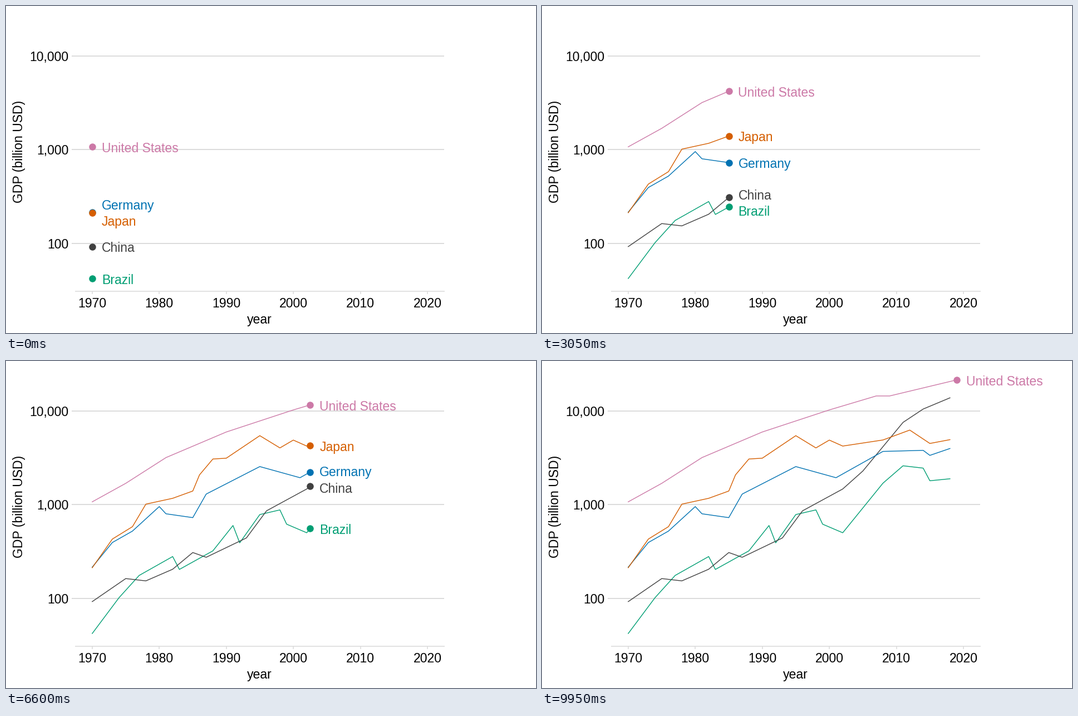
Write a matplotlib script that moves like this. It is 952 px wide and 588 px high and loops after 10 s.

```python
import matplotlib.pyplot as plt
import numpy as np
from matplotlib.animation import FuncAnimation

W, H, DPI = 952, 588, 112
PX = 72 / DPI                      # points per pixel
FRAMES, INTERVAL = 200, 50
START, SPAN = 1970, 49
GREY = "#d9d9d9"
LABEL_GAP, BASELINE = 29.3, 9.6

plt.rcParams["font.family"] = "Liberation Sans"

# Turning points: year and GDP in billion USD, growth is steady in between
brazil = {1970: 42.3, 1974: 102, 1977: 176, 1982: 280, 1983: 204, 1988: 322,
          1991: 600, 1992: 392, 1995: 785, 1998: 880, 1999: 620, 2002: 502,
          2008: 1696, 2011: 2600, 2014: 2456, 2015: 1800, 2018: 1890}
china = {1970: 92.6, 1975: 163, 1978: 154, 1982: 205, 1985: 309, 1987: 275,
         1993: 442, 1996: 860, 2002: 1471, 2005: 2286, 2011: 7552,
         2014: 10476, 2018: 13800}
germany = {1970: 215.8, 1973: 395, 1976: 523, 1980: 955, 1981: 800, 1985: 728,
           1987: 1298, 1995: 2550, 2001: 1940, 2008: 3700, 2014: 3800,
           2015: 3358, 2018: 3977}
japan = {1970: 212.6, 1973: 430, 1976: 583, 1978: 1014, 1982: 1170, 1985: 1399,
         1986: 2079, 1988: 3072, 1990: 3133, 1995: 5449, 1998: 4033,
         2000: 4888, 2002: 4220, 2008: 4900, 2012: 6250, 2015: 4500,
         2018: 4940}
usa = {1970: 1073, 1975: 1690, 1981: 3180, 1990: 5963, 2000: 10252,
       2007: 14452, 2009: 14449, 2019: 21433}

# Each year is reached on a whole frame
STEPS = np.arange(SPAN + 1)
ARRIVAL = np.rint(STEPS * (FRAMES - 1) / SPAN)


def x_at(step):
    return 154.9 + 12.04 * step


def y_at(value):
    return 427 - 168.6 * (np.log10(value) - 2)


def write(x, y, text, color="black", **kw):
    return ax.text(x, y, text, color=color, fontsize=23 * PX,
                   va="baseline", **kw)


def rule(xs, ys, width):
    ax.plot(xs, ys, color=GREY, lw=width * PX, solid_capstyle="butt",
            snap=True, zorder=1)


class Series:
    def __init__(self, name, points, color, order):
        years = np.array(list(points)) - START
        self.steps = STEPS[:years[-1] + 1]
        self.y = np.interp(self.steps, years, y_at(list(points.values())))
        self.end = ARRIVAL[years[-1]]
        self.line, = ax.plot([], [], color=color, lw=1.4 * PX,
                             solid_joinstyle="round", zorder=2 + order / 10)
        self.dot, = ax.plot([], [], "o", color=color, ms=12.5 * PX, mew=0,
                            zorder=3 + order / 10)
        self.label = write(0, 0, name, color, zorder=4)

    def move(self, frame):
        pos = min(np.interp(frame, ARRIVAL, STEPS), self.steps[-1])
        x, n = x_at(pos), int(pos) + 1
        self.now = np.interp(pos, self.steps, self.y)
        self.line.set_data(np.append(x_at(self.steps[:n]), x),
                           np.append(self.y[:n], self.now))
        self.dot.set_data([x], [self.now])
        self.label.set_x(x + 17)
        self.shown = frame <= self.end
        self.dot.set_visible(self.shown)
        self.label.set_visible(self.shown)


def spread(ys):
    """Push sorted positions apart to LABEL_GAP, keeping each cluster centred."""
    blocks = []
    for i, y in enumerate(ys):
        blocks.append([y - i * LABEL_GAP, 1])
        while len(blocks) > 1 and blocks[-2][0] > blocks[-1][0]:
            b, m = blocks.pop()
            a, n = blocks.pop()
            blocks.append([(a * n + b * m) / (n + m), n + m])
    flat = [base for base, n in blocks for _ in range(n)]
    return [base + i * LABEL_GAP for i, base in enumerate(flat)]


fig = plt.figure(figsize=(W / DPI, H / DPI), dpi=DPI, facecolor="white")
ax = fig.add_axes([0, 0, 1, 1])
ax.set_xlim(0, W)
ax.set_ylim(H, 0)
ax.axis("off")

for value in (100, 1000, 10000):
    y = round(y_at(value))
    rule([118, 787], [y, y], 1.8)
    write(112.5, y + 9, f"{value:,}", ha="right")
rule([124, 788], [513, 513], 1.5)
for step in range(0, 51, 10):
    x = x_at(step)
    rule([x, x], [513, 518], 1.5)
    write(x, 542, str(START + step), ha="center")
write(455, 571, "year", ha="center")
write(30, 261.5, "GDP (billion USD)", ha="center", rotation=90,
      rotation_mode="anchor")

series = [Series(*args, order) for order, args in enumerate([
    ("Brazil", brazil, "#009e73"),
    ("China", china, "#404040"),
    ("Germany", germany, "#0072b2"),
    ("Japan", japan, "#d55e00"),
    ("United States", usa, "#cc79a7"),
])]


def update(frame):
    for s in series:
        s.move(frame)
    live = sorted((s for s in series if s.shown), key=lambda s: s.now)
    for s, y in zip(live, spread([s.now for s in live])):
        s.label.set_y(y + BASELINE)
    return []


anim = FuncAnimation(fig, update, frames=FRAMES, interval=INTERVAL,
                     init_func=lambda: update(0), repeat=True, repeat_delay=0)
plt.show()
```
